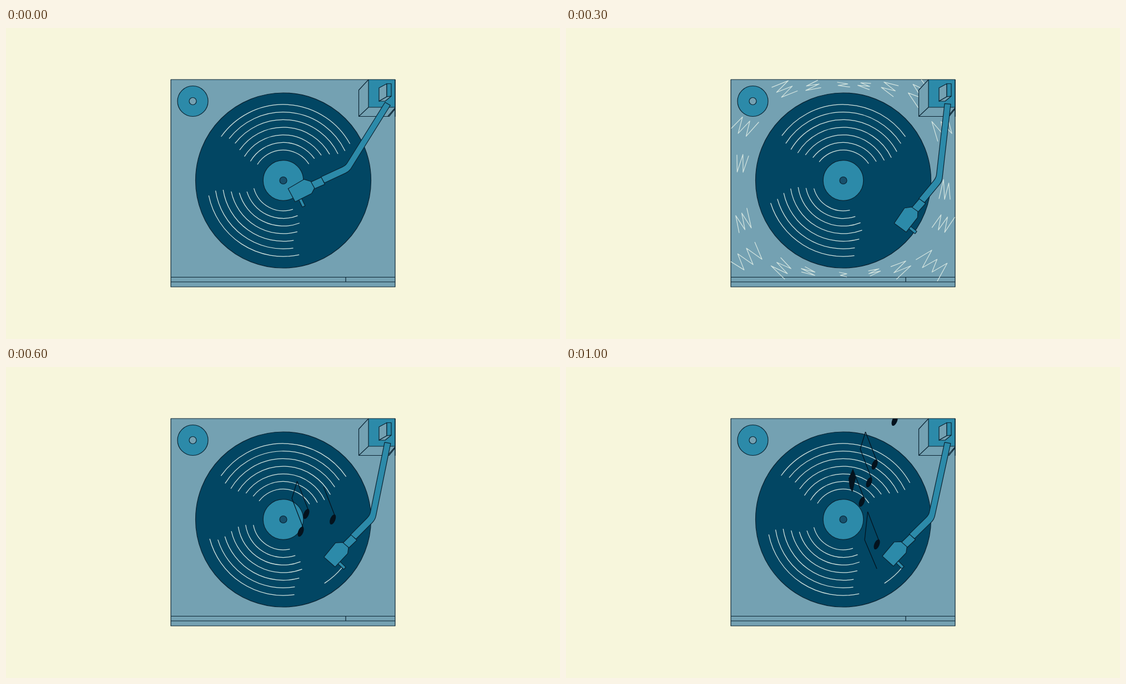
Recreate the animation shown at these times as an HTML page. Size 998 by 561 pixels, loop 1100 ms.

```html
<!DOCTYPE html>
<html lang="en">
<head>
<meta charset="utf-8">
<title>Turntable</title>
<style>
  html, body { margin: 0; width: 100%; height: 100%; overflow: hidden; background: #f7f6dc; }
  svg { display: block; width: 100%; height: 100%; }
  .ink { stroke: #0a2433; stroke-width: 1.2; stroke-linejoin: round; }
  .body { fill: #74a1b2; }
  .blue { fill: #2c8aa9; }
  .deep { fill: #024663; }
  .line { fill: none; }
  .chalk { fill: none; stroke: #d3e4df; stroke-width: 1.25; stroke-linecap: round; stroke-linejoin: round; }
  #notes { stroke: #04121d; stroke-width: 1.2; fill: none; }
  #notes .solid { fill: #04121d; stroke: none; }
</style>
</head>
<body>
<svg viewBox="0 0 998 561">
  <clipPath id="lid"><rect x="297" y="93" width="404" height="374"/></clipPath>

  <g class="ink">
    <rect class="body" x="297" y="93" width="404" height="374"/>
    <path class="line" d="M297 449.5H701M297 458H701M612 449.5V458"/>
  </g>

  <path id="sparks" class="chalk" clip-path="url(#lid)"/>

  <g class="ink">
    <circle class="blue" cx="336.5" cy="132" r="27.5"/>
    <circle class="body" cx="336.5" cy="132" r="6.5"/>
    <circle class="deep" cx="499.5" cy="275" r="158"/>
  </g>
  <path id="grooves" class="chalk"/>
  <path id="trail" class="chalk"/>
  <g class="ink">
    <circle class="blue" cx="499.5" cy="275" r="36.3"/>
    <circle cx="499.5" cy="275" r="6.5" fill="#17506c"/>
  </g>

  <g class="ink" clip-path="url(#lid)">
    <path class="body" d="M653 93L635.5 112V159.5H690L701 146V93Z"/>
    <path class="blue" d="M653 93H701V143H653Z"/>
    <path class="line" d="M635.5 159.5L653 143M688 159L701 144"/>
    <path class="body" d="M672 108L686 100.5V124L672 132Z"/>
    <path class="blue" d="M686 100.5H694V123L686 124Z"/>
    <path class="body" d="M672 132L686 124L694 123L683 132Z"/>
  </g>
  <path class="ink line" d="M701 93V160"/>

  <g id="notes" clip-path="url(#lid)"></g>

  <g id="arm" class="ink blue">
    <path d="M641 363L653 371L650 375.5L638 367.5Z"/>
    <path d="M682 137H693L690 270Q690 277 686 283L662 318L651 312L675 277Q679 271 679 266Z"/>
    <path d="M652 312L664 319.5L652 336L640 329Z"/>
    <path d="M611 360L627 331L639.5 328L651.5 335L652 346L634 374Z"/>
  </g>
</svg>

<script>
const STEP = 100, STEPS = 11;
const CX = 499.5, CY = 275;
const $ = id => document.getElementById(id);

// Point around the record; 0 degrees is up, clockwise.
function polar(r, deg) {
  const a = deg * Math.PI / 180;
  return [CX + r * Math.sin(a), CY - r * Math.cos(a)];
}

// Swings out quickly, then settles back over the record.
function armAngle(step) {
  return step < 2
    ? 30.6 * (1 - (step / 2) ** 2.1)
    : 11.1 * (1 - Math.exp((2 - step) / 1.6));
}

// Groove ends follow a wave across the rings: its middle, height and phase in each pose.
const RINGS = 7;
const ENDS = {
  topLeft:  { mid: 55.5, amp: 3.8, phase: { a: 3.4, b: -0.5, c: -0.2 } },
  topRight: { mid: 59.5, amp: 5,   phase: { a: 0.3, b: -1.4, c: -2.2 } },
  lowLeft:  { mid: 77,   amp: 4.5, phase: { a: 0.3, b: -1.6, c: -2.7 } },
  lowRight: { mid: 15,   amp: 7,   phase: { a: 3.6, b: -1.8, c: -1.8 } }
};
const POSES = "ababcacbcba";

function arc(r, from, to) {
  return `M${polar(r, from)}A${r} ${r} 0 0 1 ${polar(r, to)}`;
}

function groovePath(step) {
  let d = "";
  for (let i = 0; i < RINGS; i++) {
    const end = name => {
      const { mid, amp, phase } = ENDS[name];
      return mid + amp * Math.sin(i * 2 * Math.PI / RINGS + phase[POSES[step]]);
    };
    const r = 137 - 13.7 * i;
    d += arc(r, -end("topLeft"), end("topRight"));
    d += arc(r, 180 - end("lowRight"), 180 + end("lowLeft"));
  }
  if (step > 4) d += arc(137, 129, step > 5 ? 147 : 138);
  return d;
}

function seeded(seed) {
  return () => {
    const v = Math.sin(seed++ * 12.9898) * 43758.5453;
    return v - Math.floor(v);
  };
}

// Zigzag from one point to another, swinging to both sides.
function zigzag([x1, y1], [x2, y2], count, swing, random) {
  const len = Math.hypot(x2 - x1, y2 - y1);
  const nx = (y2 - y1) / len, ny = (x1 - x2) / len;
  const points = Array.from({ length: count }, (_, i) => {
    const t = i / (count - 1);
    const side = (i % 2 ? 1 : -1) * swing * (0.7 + 0.5 * random());
    return [x1 + (x2 - x1) * t + nx * side, y1 + (y2 - y1) * t + ny * side];
  });
  return "M" + points.join("L");
}

// Distance from the record's centre to the edge of the lid.
function edge(deg) {
  const a = deg * Math.PI / 180, s = Math.sin(a), c = Math.cos(a);
  return Math.min(194 / Math.abs(s), (c > 0 ? 177 : 169) / Math.abs(c));
}

const SPARK_ANGLES = [-33, -18, 0, 13, 26, 40, 62, 95, 113, 133, 147, 161, 180, 201, 215, 231, 248, 279, 299];
// Visible stretch of each spark and how wide it swings.
const SPARK_STAGES = {
  1: { from: 0, to: 0.35, swing: 0.5 },
  2: { from: 0, to: 1, swing: 1 },
  3: { from: 0.35, to: 1, swing: 0.8 },
  4: { from: 0.45, to: 1, swing: 0.25 }
};

function sparkPath(step) {
  const stage = SPARK_STAGES[step];
  if (!stage) return "";
  return SPARK_ANGLES.map((deg, i) => {
    const inner = 164, span = edge(deg) - inner;
    const r1 = inner + span * stage.from;
    const r2 = Math.max(inner + span * stage.to, r1 + 8);
    const count = 4 + Math.round((r2 - r1) / 14 * stage.swing);
    const swing = Math.min(20, 6 + span / 2) * stage.swing;
    return zigzag(polar(r1, deg), polar(r2, deg), count, swing, seeded(i * 20 + 1));
  }).join("");
}

// Scratch left by the stylus as it lifts away.
function trailPath(step) {
  if (step === 1) return zigzag([542, 335], [567, 331], 5, 6, seeded(5));
  if (step === 2) return zigzag([538, 316], [622, 377], 9, 18, seeded(9));
  return "";
}

const head = (x, y) =>
  `<ellipse class="solid" rx="4.6" ry="9.6" transform="translate(${x} ${y}) rotate(22)"/>`;
const stem = `<path d="M-16.5 -59L4 -6"/>` + head(0, 0);
const SHAPES = {
  single: stem,
  pair: stem + `<path d="M-16.5 -59L-26 -28L-6 24"/>` + head(-10, 32),
  rising: stem + `<path d="M-16.5 -59L-22 -8L0 44"/>`,
  flag: stem + `<path class="solid" d="M-16.5 -59L-24 -42L-22 -26L-17 -17L-11 -43Z"/>`
};
// Each note drifts through its [step, x, y] points.
const NOTES = [
  { shape: "pair", path: [[5, 541, 359], [8, 541, 77]] },
  { shape: "single", path: [[5, 598, 326], [8, 570, 173], [10, 592, 97]] },
  { shape: "pair", path: [[7, 550, 333], [10, 556, 176]] },
  { shape: "flag", path: [[8, 541, 366], [10, 533, 243]] },
  { shape: "rising", path: [[10, 560, 320], [11, 560, 268]] }
];

function noteMarkup(step) {
  return NOTES.map(({ shape, path }) => {
    const i = path.findIndex((p, k) => k && step >= path[k - 1][0] && step <= p[0]);
    if (i < 0) return "";
    const [s1, x1, y1] = path[i - 1], [s2, x2, y2] = path[i];
    const t = (step - s1) / (s2 - s1);
    return `<g transform="translate(${x1 + (x2 - x1) * t} ${y1 + (y2 - y1) * t})">${SHAPES[shape]}</g>`;
  }).join("");
}

function draw(step) {
  $("arm").setAttribute("transform", `rotate(${armAngle(step)} 688 137)`);
  $("grooves").setAttribute("d", groovePath(step));
  $("sparks").setAttribute("d", sparkPath(step));
  $("trail").setAttribute("d", trailPath(step));
  $("notes").innerHTML = noteMarkup(step);
}

let shown = -1;
const start = performance.now();
function tick() {
  const step = Math.floor(Math.max(0, performance.now() - start) / STEP) % STEPS;
  if (step !== shown) draw(shown = step);
  requestAnimationFrame(tick);
}
tick();
</script>
</body>
</html>
```
